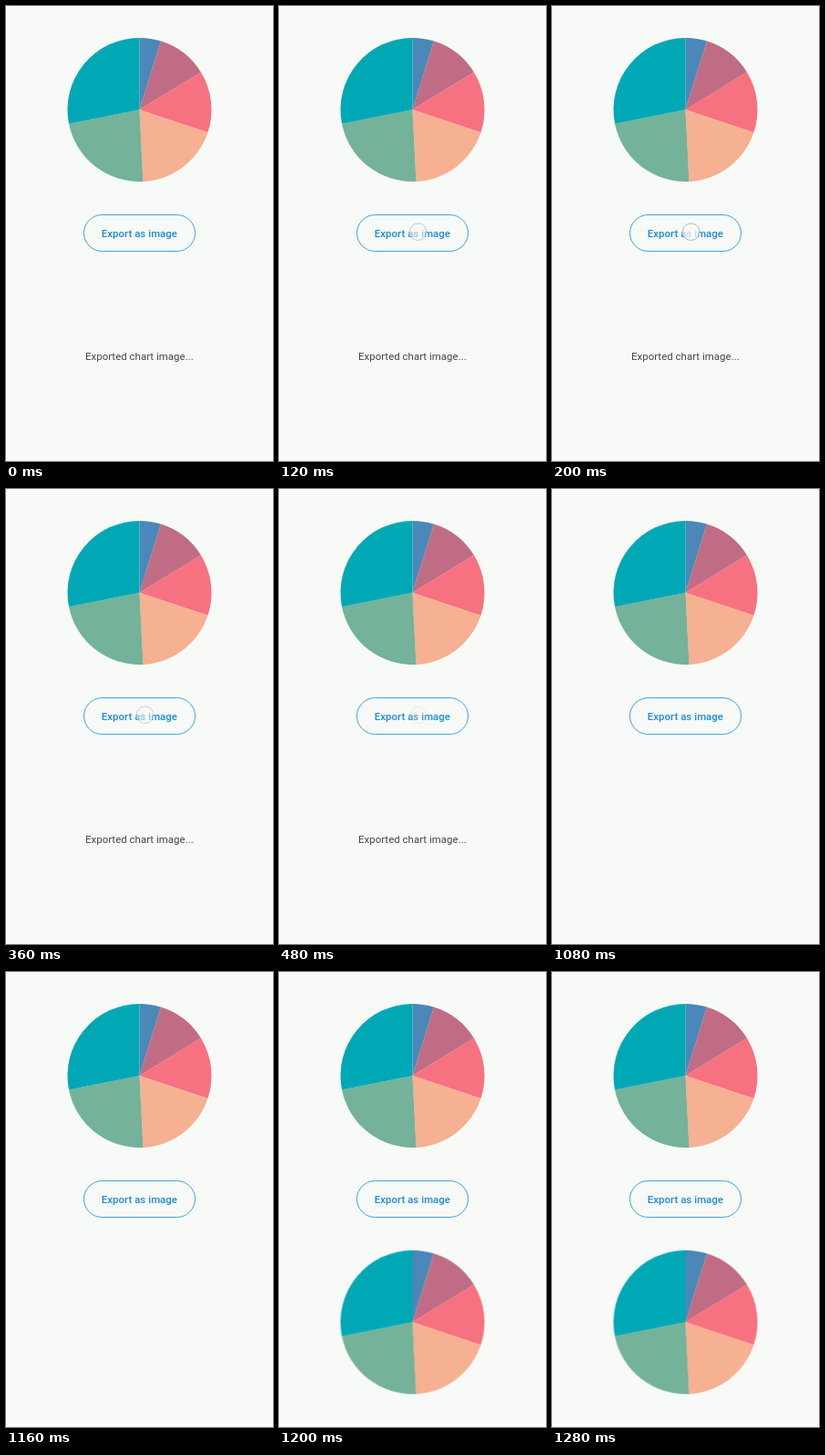
Animation of 293 by 500 pixels, one loop 2.04 s. Source, as an HTML page:

```html
<!DOCTYPE html>
<html lang="en">
<head>
<meta charset="utf-8">
<title>Export chart</title>
<style>
  html, body { margin: 0; width: 100%; height: 100%; overflow: hidden; background: #f7faf7; }
  svg { display: block; width: 293px; height: 500px; }
  text { font: 400 11.4px Roboto, sans-serif; letter-spacing: .05px; text-anchor: middle; fill: #424543; }
  .button rect { fill: none; stroke: #43a0e2; }
  .button text { font-weight: 500; fill: #2089de; }
  #touch { fill: #f9fbf9; fill-opacity: .72; stroke: #b4b8b6; }
</style>
</head>
<body>
<svg viewBox="0 0 293 500">
  <defs><g id="pie"></g></defs>
  <use href="#pie" x="146.5" y="114"/>
  <g class="button">
    <rect x="85.5" y="229.5" width="122" height="40" rx="20"/>
    <text x="146.4" y="253.6">Export as image</text>
  </g>
  <circle id="touch" cx="152.6" cy="248.2" r="9.3"/>
  <text id="status" x="146.4" y="389">Exported chart image...</text>
  <use id="copy" href="#pie" x="146.5" y="384.8"/>
</svg>
<script>
const LOOP = 2040;
const RADIUS = 79;
const byId = id => document.getElementById(id);

// Each slice: end angle in degrees clockwise from the top, colour.
const slices = [
  [17.3, '#4b87b9'], [58.6, '#c06c84'], [108.5, '#f67280'],
  [177.1, '#f6b092'], [258.7, '#74b29a'], [360, '#00a8b5']
];

const rim = degrees => {
  const a = degrees * Math.PI / 180;
  return `${RADIUS * Math.sin(a)} ${-RADIUS * Math.cos(a)}`;
};

let start = 0;
for (const [end, colour] of slices) {
  const slice = document.createElementNS('http://www.w3.org/2000/svg', 'path');
  slice.setAttribute('d', `M0 0L${rim(start)}A${RADIUS} ${RADIUS} 0 0 1 ${rim(end)}Z`);
  slice.setAttribute('fill', colour);
  byId('pie').append(slice);
  start = end;
}

// Steps are [ms, opacity]; each value holds until the next one.
function hold(id, steps) {
  const frames = [...steps, [LOOP, steps.at(-1)[1]]].map(([ms, opacity]) =>
    ({ offset: ms / LOOP, opacity, easing: 'step-end' }));
  return byId(id).animate(frames, { duration: LOOP, iterations: Infinity });
}

hold('touch', [
  [0, 0], [40, .25], [80, .5], [120, .75], [160, .9], [200, 1],
  [280, .9], [320, .78], [360, .66], [400, .5], [440, .35], [480, .2],
  [520, .06], [600, .03], [680, 0]
]);
hold('status', [[0, 1], [1080, 0]]);
hold('copy', [[0, 0], [1200, 1]]);
</script>
</body>
</html>
```
